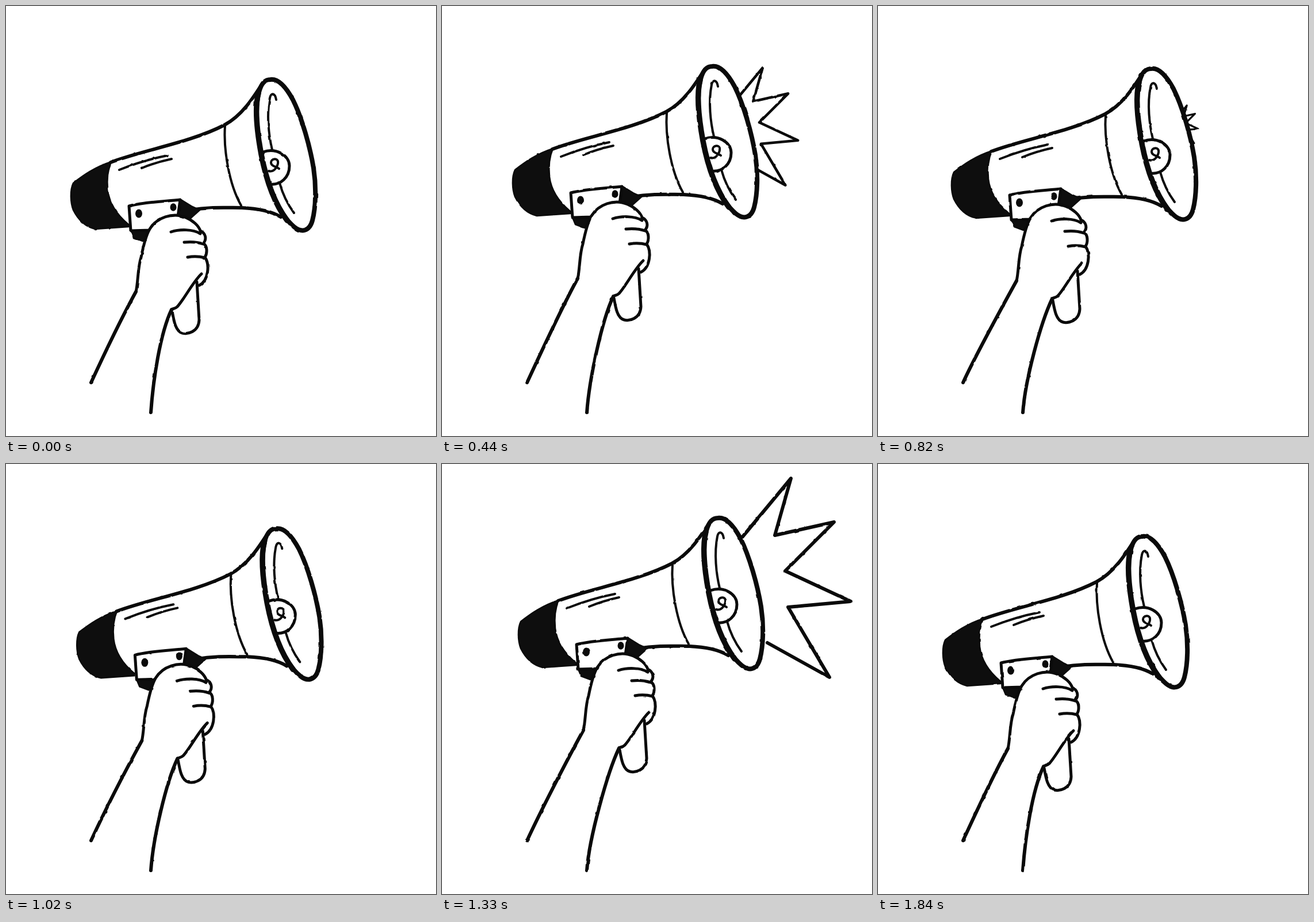
An HTML page for the animation above (1940 ms loop, 748 by 748 pixels).

```html
<!DOCTYPE html>
<html lang="en">
<head>
<meta charset="utf-8">
<title>Megaphone</title>
<style>
  html, body { margin: 0; width: 100%; height: 100%; overflow: hidden; background: #fff; }
  svg { display: block; width: 100vw; height: 100vh; }
  path { fill: none; stroke: #0a0a0a; stroke-width: 5px; stroke-linecap: round; stroke-linejoin: round; }
  .thin { stroke-width: 4px; }
  .bold { stroke-width: 6px; }
  .rim { stroke-width: 8px; }
  .edge { stroke-width: 9.5px; }
  .paper { fill: #fff; }
  .ink { fill: #0e0e0e; stroke-width: 2.5px; }
  .bare { fill: #fff; stroke: none; }
  #burst { vector-effect: non-scaling-stroke; }
</style>
</head>
<body>
<svg viewBox="0 0 748 748">
  <filter id="rough" filterUnits="userSpaceOnUse" x="0" y="0" width="748" height="748" color-interpolation-filters="sRGB">
    <feTurbulence id="noise" type="fractalNoise" baseFrequency=".08"/>
    <feDisplacementMap in="SourceGraphic" scale="2.5" xChannelSelector="R" yChannelSelector="G"/>
  </filter>
  <g filter="url(#rough)">
    <g id="body">
      <!-- burst is centred on the origin and scaled -->
      <path id="burst" d="M14 -73L101 -178L73 -79L176 -102L91 -17L205 36L96 46L168 168L60 108"/>

      <!-- horn and rear cap -->
      <path class="bare" d="M182 272C240 250 320 238 380 207C410 191 430 160 447 133L478 367C460 356 435 352 410 351C385 351 355 349 325 354L213 385Z"/>
      <path class="bold" d="M182 272C240 250 320 238 380 207C410 191 430 160 447 133"/>
      <path class="bold" d="M320 355C355 349 385 351 410 351C435 352 460 356 478 367"/>
      <path class="ink" d="M183 271C155 280 135 294 117 308C111 320 112 342 117 355C125 371 138 384 155 388L213 384V380C195 365 180 345 177 320C175 300 177 285 183 271Z"/>
      <path class="thin" d="M381 208C378 250 388 310 409 347"/>
      <path class="thin" d="M197 285C222 275 250 266 281 260M236 282Q260 272 288 266"/>

      <!-- mouth of the horn -->
      <path class="paper rim" d="M460 128C474 126 487 141 499 163C515 195 529 245 535 282C540 315 539 350 533 373C528 392 514 395 501 384C472 360 453 305 444 258C436 215 433 175 440 150C444 135 450 128 460 128Z"/>
      <path class="edge" d="M489 373C468 345 453 305 444 258C436 215 433 175 439 152"/>
      <path class="thin" d="M470 163C468 151 461 150 459 160C453 190 457 225 463 250M476 308C482 330 490 345 501 360"/>
      <path d="M447 254C470 246 493 260 493 278C493 298 478 312 459 310"/>
      <path class="thin" d="M457 287C468 290 474 276 473 270C471 264 461 266 461 272C461 279 470 279 475 283"/>

      <!-- mount -->
      <path class="ink" d="M217 391L222 403L238 409L252 390Z"/>
      <path class="ink" d="M303 336L324 349L337 355L318 372L298 364Z"/>
      <path class="paper" d="M214 348C240 341 275 340 303 337L299 366L250 390L217 391Z"/>
      <ellipse cx="231" cy="361" rx="6" ry="7.5" fill="#0a0a0a"/>
      <ellipse cx="291" cy="350" rx="5.5" ry="6.8" fill="#0a0a0a"/>

      <!-- hand and grip -->
      <path class="paper" d="M226 497C230 480 229 455 235 437C240 412 244 398 250 388C262 368 290 358 313 368C325 373 335 382 338 391C347 395 350 405 343 413C351 417 350 431 346 437C355 450 352 478 336 486"/>
      <path d="M287 393C302 388 325 388 338 396M310 411Q329 409 343 414M316 437Q331 434 346 438"/>
      <path d="M340 466C325 480 310 510 298 523C294 527 290 526 288 528"/>
      <path d="M332 480L336 546C335 568 315 571 307 569C295 566 292 548 289 531"/>
    </g>
    <path id="arm" class="bold"/>
  </g>
</svg>
<script>
// Three slow frames, then two beats of six fast and four slow frames.
const SLOW = 100, FAST = 70, INTRO = 3 * SLOW, RUN = 6 * FAST;
const BEAT = RUN + 4 * SLOW, LOOP = INTRO + 2 * BEAT;

// time, shift x, shift y of the raised megaphone
const keys = [
  [0, 0, 0], [440, 10, -23], [510, 20, -34], [820, 15, -19],
  [1120, 8, -14], [1330, 20, -34], [1540, 10, -20], [1840, 0, -2]
];

const el = id => document.getElementById(id);
const body = el("body"), burst = el("burst"), arm = el("arm"), noise = el("noise");

// The drawing held at time t: its start, its beat (-1 in the intro) and its place in the beat
function frameAt(t) {
  if (t < INTRO) {
    const n = Math.floor(t / SLOW);
    return { start: n * SLOW, beat: -1, n };
  }
  const beat = Math.floor((t - INTRO) / BEAT);
  const from = INTRO + beat * BEAT, v = t - from;
  const n = v < RUN ? Math.floor(v / FAST) : 6 + Math.floor((v - RUN) / SLOW);
  return { start: from + Math.min(n, 6) * FAST + Math.max(n - 6, 0) * SLOW, beat, n };
}

function shiftAt(t) {
  const i = Math.max(1, keys.findIndex(k => k[0] >= t));
  const [t0, x0, y0] = keys[i - 1], [t1, x1, y1] = keys[i];
  const p = (t - t0) / (t1 - t0);
  return [x0 + (x1 - x0) * p, y0 + (y1 - y0) * p];
}

// The burst opens over three frames, then shrinks; the second one fades faster.
function burstScale({ beat, n }) {
  if (beat < 0) return 0;
  if (n <= 3) return (n / 3) ** 1.3;
  const k = (beat ? .57 : .66) ** (n - 3);
  return k > .18 ? k : 0;
}

function draw(frame) {
  const [dx, dy] = shiftAt(frame.start), k = burstScale(frame);
  const at = (x, y) => `${x + dx} ${y + dy}`;
  noise.setAttribute("seed", frame.start);
  body.setAttribute("transform", `translate(${dx} ${dy})`);

  const slide = (1 - k) ** 3; // a small burst sits closer to the rim
  burst.style.display = k ? "" : "none";
  burst.style.strokeWidth = 2.6 + 3.4 * k + "px";
  burst.setAttribute("transform", `translate(${486 + 32 * slide} ${237 - 21 * slide}) scale(${k || 1})`);

  // forearm: the elbow end stays put while the wrist follows the hand
  arm.setAttribute("d",
    `M148 655C172 603 ${at(198, 548)} ${at(226, 497)}` +
    `M252 707C256 650 ${at(268, 570)} ${at(288, 528)}`);
}

let shown = -1;
function tick() {
  const frame = frameAt(performance.now() % LOOP);
  if (frame.start !== shown) {
    shown = frame.start;
    draw(frame);
  }
  requestAnimationFrame(tick);
}
tick();
</script>
</body>
</html>
```
